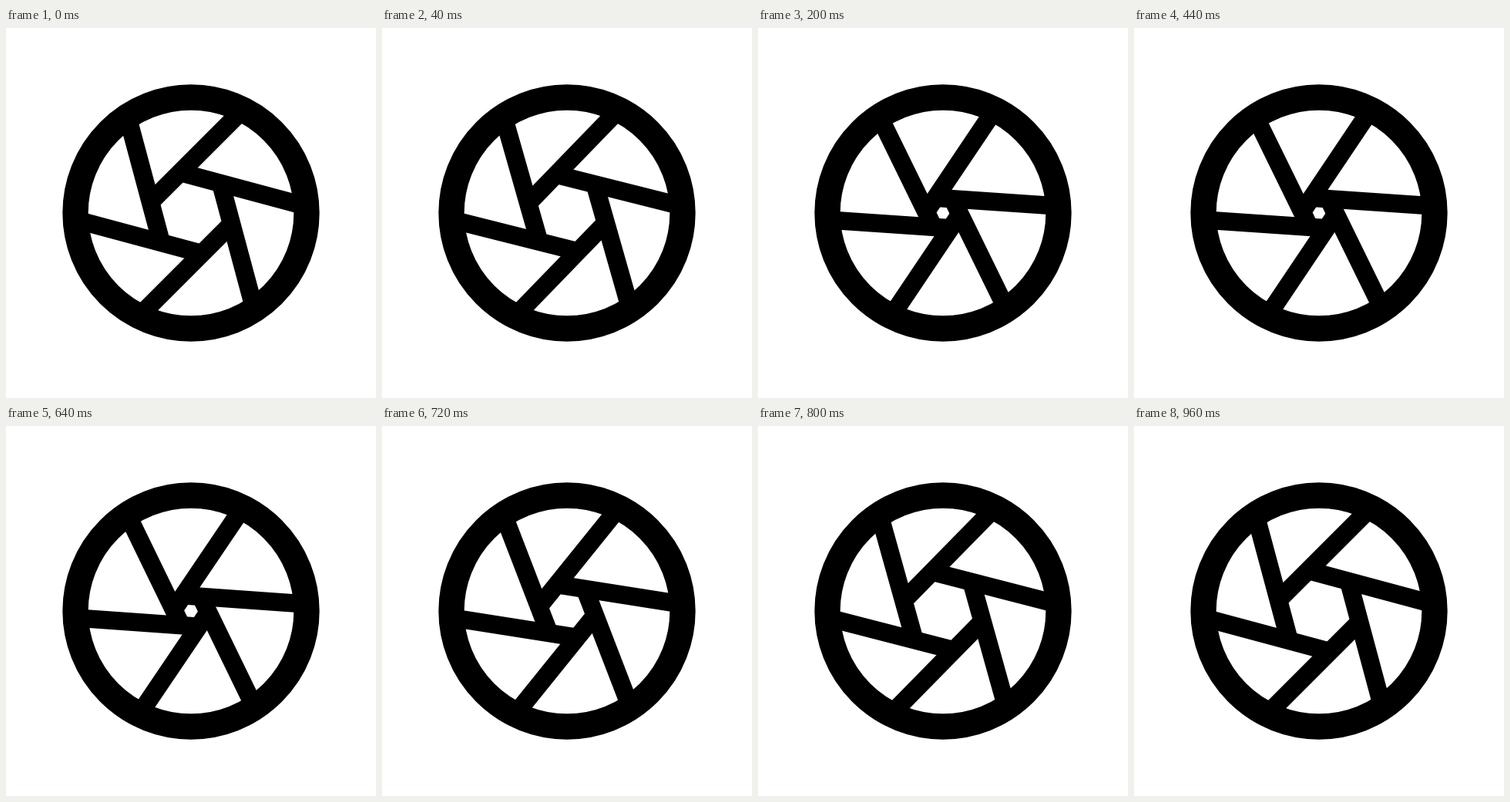
An HTML page that plays this animation: 480x480 px, repeating every 1.4 s.

```html
<!DOCTYPE html>
<html lang="en">
<head>
<meta charset="utf-8">
<title>Aperture</title>
<style>
  html, body { margin: 0; width: 100%; height: 100%; overflow: hidden; background: #fff; }
  svg { display: block; width: 100%; height: 100%; fill: none; stroke: #000; }
</style>
</head>
<body>
<svg viewBox="-240 -240 480 480">
  <circle r="150" stroke-width="33.33"/>
  <g id="blades" stroke-width="23.57"></g>
</svg>
<script>
const LOOP = 1400, TICK = 40, BLADES = 6;
const OPEN = 45, CLOSED = 56.1;           // blade angle in degrees
const PIVOT = { x: 200 / 3, y: -400 / 3 };
const REACH = Math.hypot(PIVOT.x, PIVOT.y);
const PIVOT_ANGLE = Math.atan2(-PIVOT.y, PIVOT.x);

const group = document.getElementById('blades');
const blades = Array.from({ length: BLADES }, (_, i) => {
  const blade = document.createElementNS(group.namespaceURI, 'path');
  blade.setAttribute('transform', `rotate(${i * 360 / BLADES})`);
  return group.appendChild(blade);
});

function ease(time, start, end) {
  const x = Math.min(1, Math.max(0, (time - start) / (end - start)));
  return x * x * (3 - 2 * x);
}

function draw(time) {
  const closed = ease(time, 5, 205) - ease(time, 625, 828);
  const angle = (OPEN + (CLOSED - OPEN) * closed) * Math.PI / 180;
  const swing = PIVOT_ANGLE - angle;
  // Each blade stops on the centre line of its neighbour.
  const length = REACH * (Math.cos(swing) + Math.sin(swing) / Math.sqrt(3));
  const dx = -length * Math.cos(angle), dy = length * Math.sin(angle);
  const d = `M${PIVOT.x} ${PIVOT.y}l${dx} ${dy}`;
  for (const blade of blades) blade.setAttribute('d', d);
}

const start = performance.now();
function frame() {
  const time = (performance.now() - start) % LOOP;
  draw(Math.floor(time / TICK) * TICK);
  requestAnimationFrame(frame);
}
frame();
</script>
</body>
</html>
```
